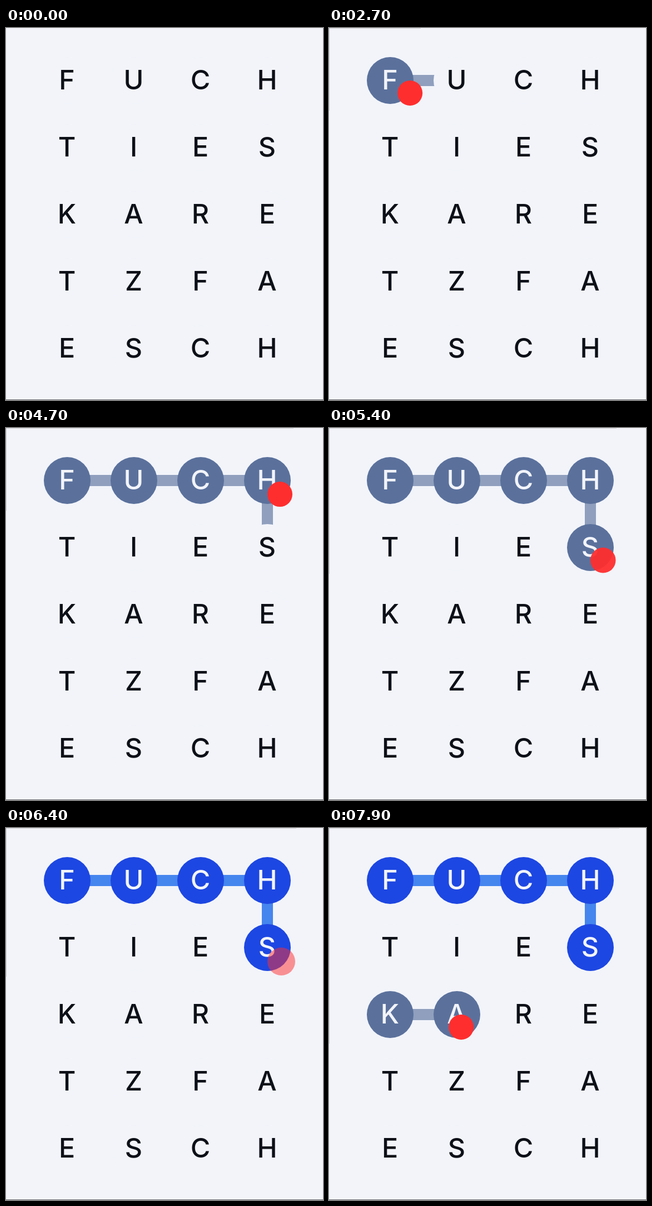
An HTML page that plays this animation: 570 px wide and 666 px high, repeating every 8000 ms.

```html
<!DOCTYPE html>
<html lang="de">
<head>
<meta charset="utf-8">
<title>Word grid</title>
<style>
  html, body { margin: 0; width: 100%; height: 100%; overflow: hidden; background: #f2f4fa; }
  svg { display: block; width: 570px; height: 666px; }
  text { font: 450 48.5px Inter, "Open Sans", sans-serif; text-anchor: middle; }
</style>
</head>
<body>
<svg viewBox="0 0 570 666">
  <g id="links" stroke-width="20"></g>
  <g id="cells"></g>
  <rect y="665" width="570" height="1" fill="#66676c"/>
  <rect id="topEdge" height="1" fill="#d0d1d6"/>
  <rect id="leftEdge" width="1" fill="#d0d1d6"/>
  <circle id="touch" fill="#ff2e2e"/>
</svg>
<script>
const LOOP = 8000, STEP = 100, EASE_MS = 320, SELECT_DELAY = 110;
const ROWS = ['FUCH', 'TIES', 'KARE', 'TZFA', 'ESCH'];
const PAPER = '#f2f4fa', INK = '#0e1018';
const PICKED = { cell: '#5b719c', link: '#8f9fbd' };
const SOLVED = { cell: '#1d47e2', link: '#4585ee' };
const SHOW = 1290, SOLVE = 5600, EDGES = 1600;

const at = (col, row) => [110 + 120 * col, 94 + 120 * row];

// Touch point: start time, column, row
const START = [422, 301];
const MOVES = [[1320, 0, 0], [2665, 1, 0], [3340, 2, 0], [4015, 3, 0],
               [4690, 3, 1], [6405, 0, 2], [7712, 1, 2]];
const PRESSES = [[1765, 1], [5365, 0], [7060, 1]];

// Selected letters: time, column, row, linked to the one before, part of the solved word
const PICKS = [[1765, 0, 0, false, true], [2665, 1, 0, true, true], [3340, 2, 0, true, true],
               [4015, 3, 0, true, true], [4690, 3, 1, true, true],
               [7060, 0, 2, false, false], [7712, 1, 2, true, false]];

// cubic-bezier(.25, .1, .25, 1)
function ease(x) {
  if (x <= 0) return 0;
  if (x >= 1) return 1;
  let lo = 0, hi = 1;
  for (let i = 0; i < 20; i++) {
    const s = (lo + hi) / 2;
    if (.75 * s * (1 - s) + s ** 3 < x) lo = s; else hi = s;
  }
  return .3 * lo * (1 - lo) ** 2 + 3 * lo * lo * (1 - lo) + lo ** 3;
}
const mix = (a, b, k) => a + (b - a) * k;
const progress = (t, start) => ease((t - start) / EASE_MS);

function touchAt(t) {
  let [x, y] = START, press = 0;
  for (const [start, col, row] of MOVES) {
    const k = progress(t, start), [tx, ty] = at(col, row);
    x = mix(x, tx, k);
    y = mix(y, ty, k);
  }
  for (const [start, value] of PRESSES) press = mix(press, value, progress(t, start));
  return { x, y, size: 50 - 5 * press, opacity: (.5 + .5 * press) * progress(t, SHOW) };
}

const byId = id => document.getElementById(id);
function set(node, attrs) {
  for (const name in attrs) node.setAttribute(name, attrs[name]);
}
function add(parent, tag, attrs) {
  const node = document.createElementNS('http://www.w3.org/2000/svg', tag);
  set(node, attrs);
  return parent.appendChild(node);
}

const cells = ROWS.map((word, row) => [...word].map((letter, col) => {
  const [x, y] = at(col, row);
  const disc = add(byId('cells'), 'circle', { cx: x, cy: y, r: 42 });
  const label = add(byId('cells'), 'text', { x: x - .5, y: y + 16 });
  label.textContent = letter;
  return { disc, label };
}));

const picks = PICKS.map(([time, col, row, linked, solved], i) => {
  let link = null;
  if (linked) {
    const [x1, y1] = at(PICKS[i - 1][1], PICKS[i - 1][2]), [x2, y2] = at(col, row);
    link = add(byId('links'), 'line', { x1, y1, x2, y2 });
  }
  return { time, solved, link, ...cells[row][col] };
});
cells.flat().forEach(({ disc, label }) => {
  set(disc, { fill: PAPER });
  set(label, { fill: INK });
});

function drawEdges(t) {
  let right = 0, bottom = 0;
  if (t >= EDGES) {
    for (let s = EDGES; s <= Math.max(EDGES, t - STEP); s += STEP) {
      const { x, y, size } = touchAt(s);
      right = Math.max(right, x + size + 2);
      bottom = Math.max(bottom, y + size + 2);
    }
  }
  set(byId('topEdge'), { width: Math.round(right) });
  set(byId('leftEdge'), { height: Math.round(bottom) });
}

function draw(t) {
  for (const { time, solved, link, disc, label } of picks) {
    const look = solved && t >= SOLVE ? SOLVED : PICKED;
    const on = t >= time + SELECT_DELAY;
    set(disc, { fill: on ? look.cell : PAPER });
    set(label, { fill: on ? PAPER : INK });
    if (link) set(link, { stroke: t >= time ? look.link : 'none' });
  }
  const { x, y, size, opacity } = touchAt(t);
  set(byId('touch'), { cx: x + size / 2, cy: y + size / 2, r: size / 2, opacity });
  drawEdges(t);
}

const begin = performance.now();
function tick() {
  const t = (performance.now() - begin) % LOOP;
  draw(Math.floor(t / STEP) * STEP);
  requestAnimationFrame(tick);
}
tick();
</script>
</body>
</html>
```
